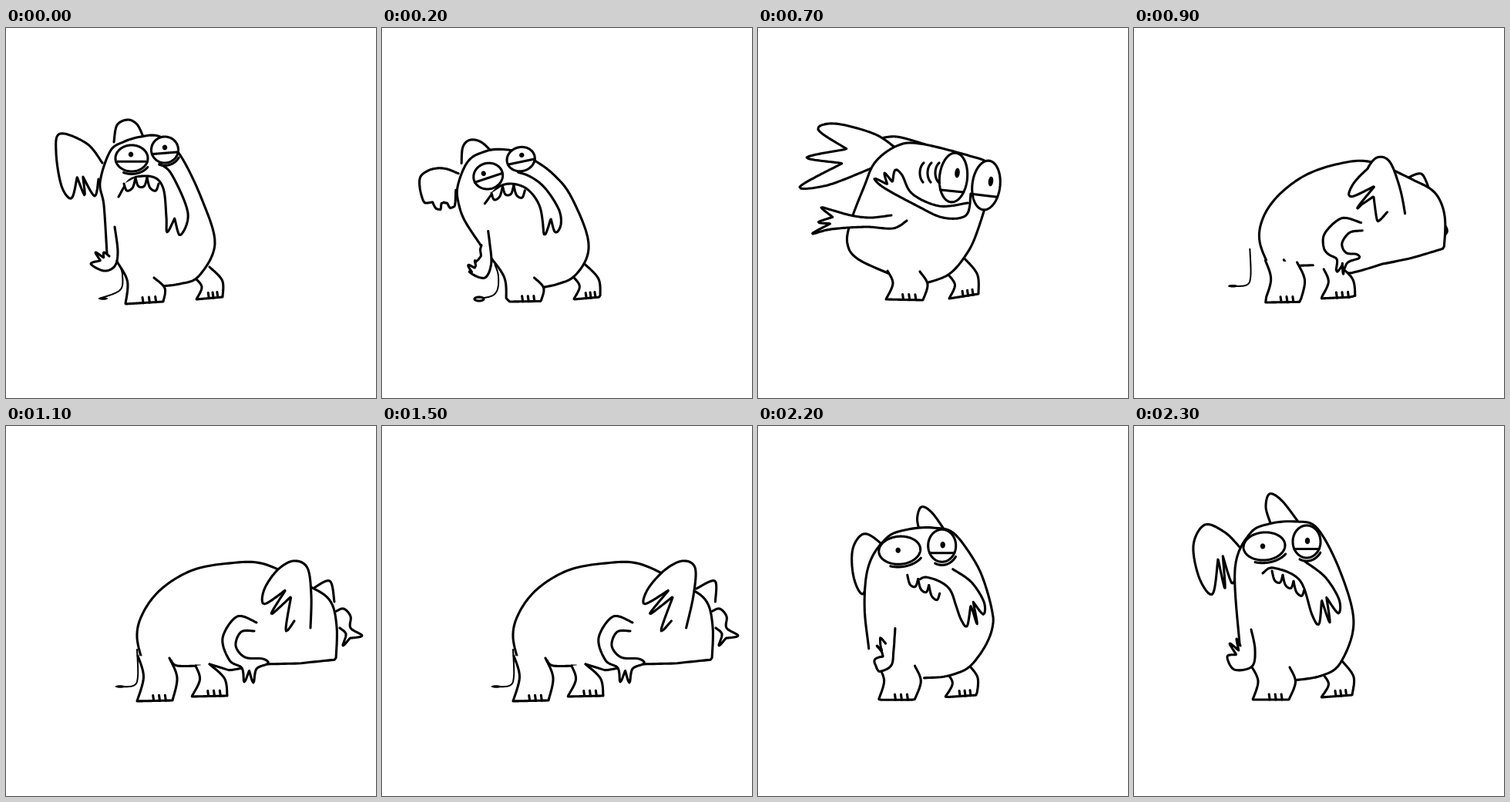
These frames come from a looping animation (480 by 480 pixels, 2400 ms). An HTML page with a canvas:

```html
<!DOCTYPE html>
<html lang="en">
<head>
<meta charset="utf-8">
<title>Big sneeze</title>
<style>
html, body { margin: 0; width: 100%; height: 100%; overflow: hidden; background: #fff; }
canvas { display: block; width: 100vw; height: 100vh; }
</style>
</head>
<body>
<canvas id="c" width="480" height="480"></canvas>
<script>
const LOOP = 2400, N = 140;
const ctx = document.getElementById('c').getContext('2d');
const lerp = (a, b, k) => a + (b - a) * k;
const mix = (p, q, k) => [lerp(p[0], q[0], k), lerp(p[1], q[1], k)];

function points(text) {
  const n = text.split(' ').map(Number), out = [];
  for (let i = 0; i < n.length; i += 2) out.push([n[i], n[i + 1]]);
  return out;
}

function spline(p) {
  const out = [];
  for (let i = 0; i < p.length - 1; i++) {
    const b = p[i], c = p[i + 1], a = p[i - 1] || b, d = p[i + 2] || c;
    for (let t = 0; t < 1; t += .125) {
      out.push([0, 1].map(m => b[m] + t / 2 * (c[m] - a[m] +
        t * (2 * a[m] - 5 * b[m] + 4 * c[m] - d[m] + t * (3 * b[m] - a[m] - 3 * c[m] + d[m])))));
    }
  }
  return [...out, p[p.length - 1]];
}

// Even spacing lets any two strokes blend.
function resample(p) {
  const len = [0];
  for (let i = 1; i < p.length; i++) {
    len.push(len[i - 1] + Math.hypot(p[i][0] - p[i - 1][0], p[i][1] - p[i - 1][1]));
  }
  const out = [], total = len[len.length - 1];
  for (let i = 0, j = 1; i <= N; i++) {
    const s = total * i / N;
    while (j < p.length - 1 && len[j] < s) j++;
    out.push(mix(p[j - 1], p[j], (s - len[j - 1]) / (len[j] - len[j - 1] || 1)));
  }
  return out;
}

// Smooth runs meet in corners.
const stroke = (key, style, ...runs) => ({ key, style, pts: resample(runs.flatMap(spline)) });
const shape = (key, text, style = 'fill') =>
  stroke(key, style, ...text.split(', ').map(points));

function arc(key, style, x, y, rx, ry, tilt = 0, from = 0, to = Math.PI * 2) {
  const pts = Array.from({ length: N + 1 }, (_, i) => {
    const a = lerp(from, to, i / N), u = rx * Math.cos(a), v = ry * Math.sin(a);
    return [x + u * Math.cos(tilt) - v * Math.sin(tilt), y + u * Math.sin(tilt) + v * Math.cos(tilt)];
  });
  return { key, style, pts };
}

// Outline that ends in fingers; gaps reach halfway to the palm.
function limb(key, out, tips, palm, back) {
  const t = points(tips), [p] = points(palm), runs = [];
  let run = points(out);
  t.forEach((tip, i) => {
    run.push(tip);
    if (i === t.length - 1) return;
    const gap = mix(mix(tip, t[i + 1], .5), p, .5);
    runs.push([...run, gap]);
    run = [gap];
  });
  return stroke(key, 'fill', ...runs, [...run, ...points(back)]);
}

// Hip, heel, toe, hip; three toe lines stand on the sole.
function leg(key, text) {
  const [a, heel, toe, b] = points(text);
  const bulge = (p, q) => [(p[0] + q[0]) / 2 + 8, (p[1] + q[1]) / 2 - 2];
  const toes = [.45, .62, .79].map((k, i) => {
    const [x, y] = mix(heel, toe, k);
    return stroke(key + i, 'line', [[x, y - 7], [x + 1, y]]);
  });
  return [stroke(key, 'fill', [a, bulge(a, heel), heel], [heel, toe], [toe, bulge(toe, b), b]), ...toes];
}

function eye(key, x, y, rx, ry, tilt, lid, dx, dy, bag) {
  const a = Math.asin(lid), parts = [
    arc(key, 'fill', x, y, rx, ry, tilt),
    arc(key + 'dot', 'dot', x + dx, y + dy, 3.2, ry / 5, tilt)
  ];
  const edge = arc('', '', x, y, rx, ry, tilt, a, Math.PI - a).pts;
  if (lid < 1) parts.push(stroke(key + 'lid', 'line', [edge[N], edge[0]]));
  if (bag) parts.push(arc(key + 'bag', 'line', x, y, rx * 1.2, ry * 1.2, tilt, .6, 2));
  return parts;
}

function teeth(x0, y0, x1, y1, bow) {
  const at = k => [lerp(x0, x1, k), lerp(y0, y1, k) - bow * Math.sin(Math.PI * k)];
  return [0, 1, 2].map(i => {
    const p = at(i / 3), q = at((i + 1) / 3);
    const low = k => { const [x, y] = mix(p, q, k); return [x, y + 11]; };
    return stroke('tooth' + i, 'fill', [p, low(.25), low(.75), q]);
  });
}

function tail(text, tip = 'dot') {
  const [x, y] = points(text).pop();
  return [shape('tail', text, 'thin'), arc('tip', tip, x + 5, y, 6, tip === 'dot' ? 1.8 : 3)];
}

// Bent double; ears swing about their lower end.
function bend(swing) {
  const sway = s => ({ ...s, pts: s.pts.map(([x, y]) => [x + swing * .2 * (260 - y), y]) });
  return [
    sway(shape('cap', '398 211 420 201 426 228')),
    limb('trunk', '433 262 441 270', '437 285 462 272', '443 272', '447 262 447 247 438 237 427 241'),
    tail('170 290 171 325 165 337 143 338'),
    shape('body', '182 321 170 275 178 242 202 211 242 187 290 178 335 179 390 206 420 226 429 260 428 303, 380 308 335 309, 290 317 264 309'),
    shape('belly', '214 304 222 311 252 311', 'line'),
    leg('legR', '246 311 241 351 287 350 264 309'),
    leg('legL', '171 298 170 357 216 356 212 301'),
    sway(limb('ear', '395 262 396 220 391 184 373 175 352 187 335 212', '335 231 344 244 363 265', '386 188', '374 253')),
    limb('arm', '325 255 300 247 281 275 290 304 306 314', '309 332 321 333', '316 302',
      '325 315 340 308 333 302 310 300 298 285 305 267 322 266')
  ];
}

const poses = {
  stand: [
    shape('cap', '177 126 171 105 176 88 192 97 215 127'),
    limb('ear', '137 157 118 138 92 128 77 155 85 198', '102 218 118 211 127 204', '108 130', '133 190'),
    leg('legR', '246 323 243 352 283 349 271 306'),
    shape('body', '137 283 131 185 150 140 175 127 210 124 238 133 268 190 285 255 268 307 243 324 207 330'),
    leg('legL', '152 311 154 355 201 355 202 313'),
    limb('arm', '152 264 157 290 153 312 130 316', '121 299 124 282 133 276', '143 303', '138 285'),
    limb('trunk', '167 191 181 184 215 200 231 245', '240 257 254 255 265 243', '240 196', '266 225 248 196 222 176'),
    teeth(179, 188, 221, 212, 3),
    eye('eyeL', 169, 156, 27, 18, -.08, 1, -2, 0, true),
    eye('eyeR', 224, 150, 18, 21, 0, .45, 1, -1, true)
  ],
  droop: [
    shape('cap', '140 148 144 126 158 119 170 125 178 141'),
    limb('ear', '125 175 105 150 70 137 65 162 72 205', '85 221 102 217 115 218', '91 168', '120 196'),
    tail('147 307 151 320 148 340 121 351'),
    leg('legR', '245 324 247 352 281 349 264 310'),
    shape('body', '131 293 127 230 122 200 135 160 152 148 175 141 200 141 226 165 254 222 271 280 250 322 225 332 200 335'),
    leg('legL', '144 303 155 358 204 355 192 324'),
    limb('arm', '141 258 145 290 141 309 127 315', '110 306 116 291 127 291', '132 305', '134 296'),
    limb('trunk', '146 219 162 196 190 193 204 208 208 245', '209 265 226 269', '220 227', '236 240 215 190 199 176'),
    teeth(153, 202, 198, 202, 9),
    eye('eyeL', 163, 169, 21, 17, 0, .25, -1, -5, true),
    eye('eyeR', 206, 158, 17.5, 17, -.08, .25, 0, -3, true)
  ],
  inhale: [
    shape('cap', '73 198 73 178 79 167 95 167 111 174'),
    limb('ear', '78 200 58 204 41 217 35 240 39 259', '48 267 64 263 76 261', '58 206', '76 222'),
    tail('146 307 151 325 146 349 121 352', 'fill'),
    leg('legR', '251 322 250 352 285 349 262 303'),
    shape('body', '128 276 87 250 77 220 90 185 110 173 135 170 178 185 211 196 240 220 267 285 248 323 210 339'),
    leg('legL', '140 295 167 353 208 354 202 324'),
    limb('arm', '135 268 137 285 139 318 126 338', '104 318 113 309 121 305', '126 330', '127 313 130 295 125 270'),
    limb('trunk', '123 235 147 212 172 214 203 237', '212 273 225 264', '220 226', '232 251 223 230 195 203 158 196'),
    teeth(133, 224, 175, 218, 9),
    eye('eyeL', 117, 211, 19, 18, -.6, .05, -10, -2),
    eye('eyeR', 159, 180, 19, 14.5, -.3, .2, 2, -7)
  ],
  sneeze: [
    shape('cap', '155 144 180 141 217 151'),
    limb('ear', '178 155 150 137 100 124', '78 132 63 168 54 206', '160 164', '90 204 147 182'),
    leg('legR', '247 320 248 351 286 345 267 298'),
    shape('body', '178 322 130 300 116 280 120 252 138 205 152 174 180 153 210 150 275 166 298 177 300 210 283 268 268 297 247 320 218 331'),
    leg('legL', '168 315 166 352 214 353 210 316'),
    limb('arm', '173 243 145 246 120 243 95 236', '82 233 78 252 70 267', '114 248', '95 261 140 258 175 260 193 250'),
    limb('trunk', '276 215 270 243 240 246 205 230 163 207', '151 195 164 188 178 184', '178 214', '187 191 200 215 235 231 272 227'),
    [0, 1, 2].map(i => arc('line' + i, 'line', 220 + 10 * i, 188, 10, 15, 0, 2.2, 4.2)),
    eye('eyeL', 253.5, 194, 18, 32, .1, .55, 5, -6),
    eye('eyeR', 296, 204, 18, 32, .12, .42, 6, -5)
  ],
  bend: bend(0),
  swing: bend(1)
};
for (const name in poses) poses[name] = poses[name].flat();

// start in ms, pose, next pose, blend
const steps = [
  [0, 'droop'], [100, 'droop', 'inhale', .25], [200, 'droop', 'inhale', .55],
  [300, 'droop', 'inhale', .85], [400, 'inhale'], [500, 'inhale', 'droop', .06],
  [600, 'inhale', 'sneeze', .12], [700, 'sneeze'], [800, 'sneeze', 'bend', .4],
  [900, 'sneeze', 'bend', .8], [1000, 'sneeze', 'bend', .96], [1100, 'bend'],
  [1300, 'bend', 'swing', .5], [1500, 'swing'], [1800, 'swing', 'bend', .6],
  [2000, 'bend'], [2100, 'bend', 'stand', .3], [2200, 'bend', 'stand', .85],
  [2300, 'stand']
];

// Strokes without a partner drift along with the body.
function blend(a, b, k) {
  if (k > .5) [a, b, k] = [b, a, 1 - k];
  const find = (pose, key) => pose.find(s => s.key === key);
  const centre = pose => [0, 1].map(m => find(pose, 'body').pts.reduce((s, p) => s + p[m], 0) / (N + 1));
  const from = centre(a), to = mix(from, centre(b), k);
  return a.map(s => {
    const other = find(b, s.key);
    const pts = s.pts.map((p, i) => other ? mix(p, other.pts[i], k)
      : [p[0] + to[0] - from[0], p[1] + to[1] - from[1]]);
    return { ...s, pts };
  });
}

function draw(pose) {
  ctx.fillStyle = '#fff';
  ctx.fillRect(0, 0, 480, 480);
  ctx.lineCap = ctx.lineJoin = 'round';
  for (const { style, pts } of pose) {
    ctx.beginPath();
    for (const [x, y] of pts) ctx.lineTo(x, y);
    ctx.fillStyle = style === 'dot' ? '#000' : '#fff';
    ctx.lineWidth = style === 'thin' ? 2 : 3.1;
    if (style === 'fill' || style === 'dot') ctx.fill();
    if (style !== 'dot') ctx.stroke();
  }
}

const frames = steps.map(([start, a, b, k]) =>
  ({ start, pose: b ? blend(poses[a], poses[b], k) : poses[a] }));
let shown;

function tick() {
  const t = performance.now() % LOOP;
  const now = frames.filter(f => f.start <= t).pop();
  if (now !== shown) draw((shown = now).pose);
  requestAnimationFrame(tick);
}
tick();
</script>
</body>
</html>
```
